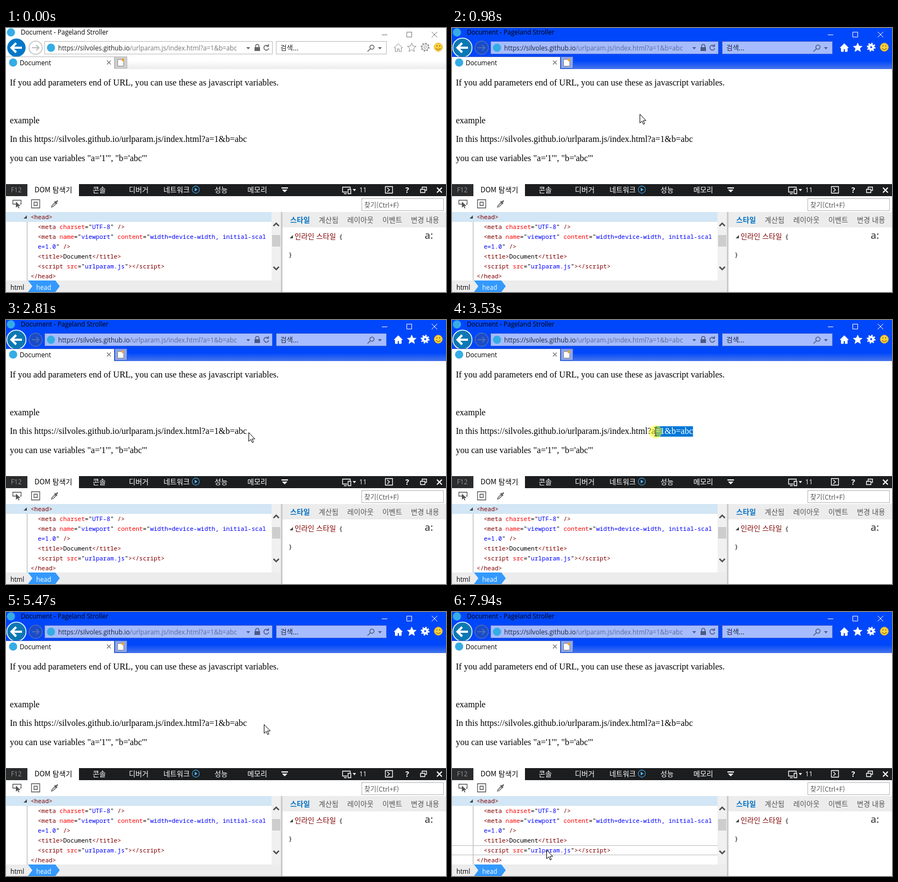
These frames come from a looping animation (802 px wide and 482 px high, 8000 ms). An HTML page:

```html
<!DOCTYPE html>
<html lang="ko">
<head>
<meta charset="utf-8">
<title>Document</title>
<style>
html, body { margin: 0; width: 100%; height: 100%; overflow: hidden; background: #fff; }
svg {
  display: block; width: 802px; height: 482px;
  --bar: #fff; --strip: #ebebeb; --field: #fff; --edge: #b9b9b9;
  --btn: #777; --icon: none; --iconEdge: #8a8a8a; --url: #222; --path: #777;
  --back: #0078c8; --fwd: #fff; --fwdEdge: #bdbdbd; --newTab: #cfcfcf; --glyph: #666;
}
svg.active {
  --bar: #0047fb; --strip: #4775ea; --field: #a6bcff; --edge: #3a5fc8;
  --btn: #fff; --icon: #fff; --iconEdge: #fff; --url: #1b2440; --path: #5c6a98;
  --back: #0c78b4; --fwd: #1a4bc8; --fwdEdge: #4a6db8; --newTab: #8ea6ea; --glyph: #4d5a85;
}
text { font: 11.7px "Open Sans", "Noto Sans", sans-serif; }
.k { font: 13px "Noto Sans CJK KR", "Noto Sans CJK", sans-serif; }
.p { font: 16px "Liberation Serif", serif; }
.c { font: 11px "Noto Sans Mono", monospace; }
.t { fill: #800000; }
.a { fill: #f00; }
.v { fill: #00f; }
.w { fill: #fff; }
.g { fill: #555; }
.line { fill: none; stroke: var(--glyph); }
.btn { fill: none; stroke: var(--btn); }
.ico { fill: var(--icon); stroke: var(--iconEdge); }
.white { fill: none; stroke: #fff; stroke-width: 1.3; }
.tool { fill: none; stroke: #555; stroke-width: 1.3; }
</style>
</head>
<body>
<svg id="stage" viewBox="0 0 802 482">
  <defs>
    <linearGradient id="strip" x2="0" y2="1">
      <stop offset=".4" style="stop-color:var(--bar)"/>
      <stop offset="1" style="stop-color:var(--strip)"/>
    </linearGradient>
    <clipPath id="picked"><rect id="pick" y="194" height="19"/></clipPath>
  </defs>

  <!-- window frame -->
  <rect width="802" height="75" style="fill:var(--bar)"/>
  <rect y="50" width="802" height="25" fill="url(#strip)"/>
  <circle cx="9" cy="8" r="7.5" fill="#35ace6"/>
  <text x="27" y="12">Document - Pageland Stroller</text>
  <path class="btn" d="M685 12.5h10M730.5 7.5h9v9h-9zM776 7l10 10m0-10l-10 10"/>

  <circle cx="19" cy="36" r="17.5" style="fill:var(--back)" stroke="#fff" stroke-width="1.5"/>
  <path d="M29 36H10m8.5-8.5L10 36l8.5 8.5" fill="none" stroke="#fff" stroke-width="4"/>
  <circle cx="54" cy="36" r="12" style="fill:var(--fwd);stroke:var(--fwdEdge)" stroke-width="1.5"/>
  <path d="M47 36h13m-5-5l5 5-5 5" fill="none" style="stroke:var(--fwdEdge)" stroke-width="2"/>

  <g style="fill:var(--field);stroke:var(--edge)">
    <rect x="70.5" y="24.5" width="415" height="23"/>
    <rect x="492.5" y="24.5" width="201" height="23"/>
  </g>
  <circle cx="82" cy="36" r="7.5" fill="#35ace6"/>
  <text x="95" y="41" style="fill:var(--path)"><tspan style="fill:var(--url)">https://silvoles.github.io</tspan>/urlparam.js/index.html?a=1&amp;b=abc</text>
  <path d="M438 35h7l-3.5 4zM678 35h7l-3.5 4zM453 35h10v7h-10z" style="fill:var(--glyph)"/>
  <path class="line" stroke-width="1.5" d="M455 35v-2a3 3 0 0 1 6 0v2M478 33a4.5 4.5 0 1 0 1 4M478.5 29.5v4h-4M664 38l-5 5"/>
  <circle class="line" cx="667" cy="35" r="3.8" stroke-width="1.5"/>
  <text class="k" x="500" y="41" style="font-size:12.4px;fill:var(--url)">검색...</text>

  <path class="ico" d="M707.5 36l7.5-7.5 7.5 7.5h-2v7h-4v-5h-3v5h-4v-7z"/>
  <path class="ico" d="M739.5 27.5l2.3 5.5 5.7.4-4.4 3.7 1.4 5.7-5-3.1-5 3.1 1.4-5.7-4.4-3.7 5.7-.4z"/>
  <circle class="ico" cx="764" cy="35" r="5.5"/>
  <circle cx="764" cy="35" r="7" fill="none" style="stroke:var(--iconEdge)" stroke-width="2" stroke-dasharray="2.75"/>
  <circle cx="764" cy="35" r="2.3" style="fill:var(--bar);stroke:var(--iconEdge)"/>
  <circle cx="788" cy="35" r="7.5" fill="#ffd23c" stroke="#dba520"/>
  <path d="M784 37q4 5 8 0M785.5 31.5v2.5M790.5 31.5v2.5" fill="none" stroke="#6d4c10" stroke-width="1.2"/>

  <rect y="52" width="197" height="23" fill="#fff"/>
  <path d="M0 52.5h197.5V74" fill="none" style="stroke:var(--edge)"/>
  <circle cx="13" cy="63" r="7.5" fill="#35ace6"/>
  <text x="25" y="68">Document</text>
  <path d="M184 59.5l7 7m0-7l-7 7" stroke="#777" stroke-width="1.3"/>
  <rect x="198.5" y="52.5" width="22" height="21" style="fill:var(--newTab);stroke:var(--edge)"/>
  <path d="M203.5 57.5h7l4 4v8h-11z" fill="#fff" stroke="#888"/>
  <circle cx="213" cy="58" r="2.5" fill="#f0a232"/>

  <!-- page -->
  <rect y="75" width="802" height="210" fill="#fff"/>
  <text class="p" x="7" y="105">If you add parameters end of URL, you can use these as javascript variables.</text>
  <text class="p" x="7" y="174">example</text>
  <text class="p" x="7" y="208" id="link">In this https://silvoles.github.io/urlparam.js/index.html?a=1&amp;b=abc</text>
  <g clip-path="url(#picked)">
    <rect x="350" y="194" width="100" height="19" fill="#0078d7"/>
    <use href="#link" class="w"/>
  </g>
  <text class="p" x="7" y="243">you can use variables "a='1'", "b='abc'"</text>

  <!-- tool tabs -->
  <rect y="285" width="802" height="22" fill="#1c1d1f"/>
  <rect y="285" width="39" height="22" fill="#2b2c2e"/>
  <rect x="39" y="285" width="94" height="22" fill="#fff"/>
  <text x="9" y="300" fill="#949494">F12</text>
  <text class="k" x="52" y="300">DOM 탐색기</text>
  <g class="w">
    <text class="k" x="158" y="300">콘솔</text>
    <text class="k" x="224" y="300">디버거</text>
    <text class="k" x="287" y="300">네트워크</text>
    <text class="k" x="380" y="300">성능</text>
    <text class="k" x="440" y="300">메모리</text>
    <text x="644" y="300">11</text>
    <text x="728" y="301" style="font-weight:bold;font-size:14px">?</text>
    <path d="M502 291h12v2h-12zM503 295h10l-5 5zM632 294h6l-3 4z"/>
  </g>
  <circle cx="346" cy="295" r="6.5" fill="none" stroke="#3b92c8" stroke-width="1.3"/>
  <path d="M344 291.5l5 3.5-5 3.5z" fill="#54b4ec"/>
  <path class="white" d="M622 299.5h-8.5v-9h14v3M616 302.5h5M623.5 294.5h5v8h-5zM691.5 289.5h13v12h-13zM695 292l4 3.5-4 3.5M755.5 294.5h8v6h-8zM758.5 294v-3.5h8v6h-3"/>
  <path class="white" d="M785.5 291.5l9 9m0-9l-9 9" style="stroke-width:2"/>

  <!-- toolbar -->
  <rect y="307" width="802" height="29" fill="#fff"/>
  <path class="tool" d="M18 321.5h-5.5v-7h15v7h-2M46.5 313.5h15v15h-15zM51 318h6v6h-6zM83 327l1-3 5-5 2 2-5 5z"/>
  <path class="g" d="M18 317v11l3-2.5 2 4 1.5-.8-2-3.7h4zM88 317l1.5-1.5 1.5 1.5 2-2.5q2 0 1.800 2l-2.5 2 1.5 1.5-1.5 1.5z"/>
  <rect x="648.5" y="311.5" width="149" height="22" fill="#fff" stroke="#b5b5b5"/>
  <text class="k g" x="653" y="328" style="font-size:12px">찾기(Ctrl+F)</text>

  <!-- markup tree -->
  <rect y="336" width="484" height="18" fill="#d2e6f5"/>
  <path d="M38.5 354v107" stroke="#a9a9a9"/>
  <path id="hover" fill="none" stroke="#bdbdbd"/>
  <path d="M38 342v6h-6z" fill="#444"/>
  <g class="t">
    <text class="c" x="45" y="349">&lt;head&gt;</text>
    <text class="c" x="58" y="367">&lt;meta <tspan class="a">charset</tspan><tspan fill="#000">="</tspan><tspan class="v">UTF-8</tspan><tspan fill="#000">"</tspan> /&gt;</text>
    <text class="c" x="58" y="385">&lt;meta <tspan class="a">name</tspan><tspan fill="#000">="</tspan><tspan class="v">viewport</tspan><tspan fill="#000">"</tspan> <tspan class="a">content</tspan><tspan fill="#000">="</tspan><tspan class="v">width=device-width, initial-scal</tspan></text>
    <text class="c" x="58" y="403"><tspan class="v">e=1.0</tspan><tspan fill="#000">"</tspan> /&gt;</text>
    <text class="c" x="58" y="421">&lt;title&gt;<tspan fill="#000">Document</tspan>&lt;/title&gt;</text>
    <text class="c" x="58" y="439">&lt;script <tspan class="a">src</tspan><tspan fill="#000">="</tspan><tspan class="v">urlparam.js</tspan><tspan fill="#000">"</tspan>&gt;&lt;/script&gt;</text>
    <text class="c" x="45" y="457">&lt;/head&gt;</text>
  </g>
  <rect x="484" y="336" width="17" height="125" fill="#f0f0f0"/>
  <rect x="485" y="378" width="15" height="21" fill="#cdcdcd"/>
  <path d="M487.5 361.5l5-5 5 5M487.5 436l5 5 5-5" fill="none" stroke="#505050" stroke-width="2.5"/>
  <rect y="461" width="501" height="21" fill="#ececec"/>
  <path d="M40 461h50l8 10.5-8 10.5H40l8-10.5z" fill="#3399ff"/>
  <text x="8" y="478">html</text>
  <text class="w" x="55" y="478">head</text>

  <!-- styles pane -->
  <rect x="501" y="336" width="3" height="146" fill="#cbcbcb"/>
  <rect x="504" y="336" width="298" height="28" fill="#ececec"/>
  <text class="k" x="518" y="355" fill="#0072c6" style="font-weight:bold">스타일</text>
  <g class="g">
    <text class="k" x="570" y="355">계산됨</text>
    <text class="k" x="622" y="355">레이아웃</text>
    <text class="k" x="686" y="355">이벤트</text>
    <text class="k" x="738" y="355">변경 내용</text>
    <text x="763" y="385" style="font-size:18px;font-weight:600">a:</text>
  </g>
  <path d="M523 378v6h-6z" fill="#444"/>
  <text class="k t" x="526" y="385">인라인 스타일</text>
  <text class="c" x="607" y="385">{</text>
  <text class="c" x="515" y="418">}</text>

  <!-- pointer -->
  <g id="pointer">
    <circle id="halo" r="12" fill="#ff0" opacity=".5"/>
    <path id="arrow" d="M.5.5v16l3.8-3.5 2.6 5.8 2.3-1-2.6-5.7h5z" fill="#fff" stroke="#000"/>
    <path id="beam" d="M-2.5-7.5h2l.5.5.5-.5h2M0-7V7M-2.5 7.5h2l.5-.5.5.5h2" fill="none" stroke="#333"/>
  </g>
</svg>
<script>
const LOOP = 8000;
const $ = id => document.getElementById(id);

// start, end, steps, evenly timed way points
const moves = [
  [70, 670, 9, [[764, 405], [620, 300], [430, 165], [324, 123], [342, 157]]],
  [1440, 1440, 1, [[342, 160]]],
  [1670, 2430, 11, [[343, 162], [356, 173], [375, 184], [398, 192], [420, 197], [440, 199]]],
  [2660, 2810, 3, [[441, 201], [442, 205]]],
  [3060, 3680, 9, [[441, 205], [428, 205], [398, 204], [371, 204], [363, 203]]],
  [4150, 4380, 4, [[378, 204], [436, 203]]],
  [4610, 4840, 4, [[442, 201], [457, 197], [470, 205]]],
  [6540, 7240, 10, [[462, 212], [360, 300], [228, 403], [141, 431]]],
  [7390, 7940, 8, [[143, 432], [150, 437], [160, 440], [172, 434]]]
];
const presses = [[900, 980], [3060, 3910], [5390, 5470]];
const rows = [[354, 372], [373, 407], [408, 425], [426, 443]];
const within = (t, [from, to]) => t >= from && t < to;
const show = (el, on) => el.setAttribute("visibility", on ? "visible" : "hidden");

function pointerAt(t) {
  const move = moves.filter(m => m[0] <= t).pop();
  if (!move) return null;
  const [start, end, steps, pts] = move;
  if (steps === 1 || t >= end) return pts[pts.length - 1];
  const step = Math.floor((t - start) / (end - start) * (steps - 1));
  const pos = step / (steps - 1) * (pts.length - 1);
  const i = Math.floor(pos), f = pos - i;
  return pts[i].map((v, k) => Math.round(v + (pts[i + 1][k] - v) * f));
}

// selects from the character edge nearest to x up to the end of the line
function pickFrom(x) {
  const link = $("link"), n = link.getNumberOfChars();
  const end = link.getEndPositionOfChar(n - 1).x;
  let from = end;
  for (let i = n - 10; i < n; i++) {
    const edge = link.getStartPositionOfChar(i).x;
    if (Math.abs(edge - x) < Math.abs(from - x)) from = edge;
  }
  $("pick").setAttribute("x", from);
  $("pick").setAttribute("width", end - from);
}

function draw(t) {
  const at = pointerAt(t);
  $("stage").classList.toggle("active", t >= 980);
  if (at) $("pointer").setAttribute("transform", `translate(${at})`);

  const beam = within(t, [3060, 4150]);
  show($("halo"), presses.some(p => within(t, p)));
  show($("beam"), beam);
  show($("arrow"), at && !beam);

  if (within(t, [3060, 5390])) pickFrom(t < 3680 ? at[0] : 363);
  else $("pick").setAttribute("width", 0);

  const row = at && at[0] < 484 && rows.find(r => within(at[1], r));
  $("hover").setAttribute("d", row ? `M0 ${row[0]}.5H484M0 ${row[1]}.5H484` : "");
}

function tick(now) {
  draw(now % LOOP);
  requestAnimationFrame(tick);
}
draw(0);
requestAnimationFrame(tick);
</script>
</body>
</html>
```
